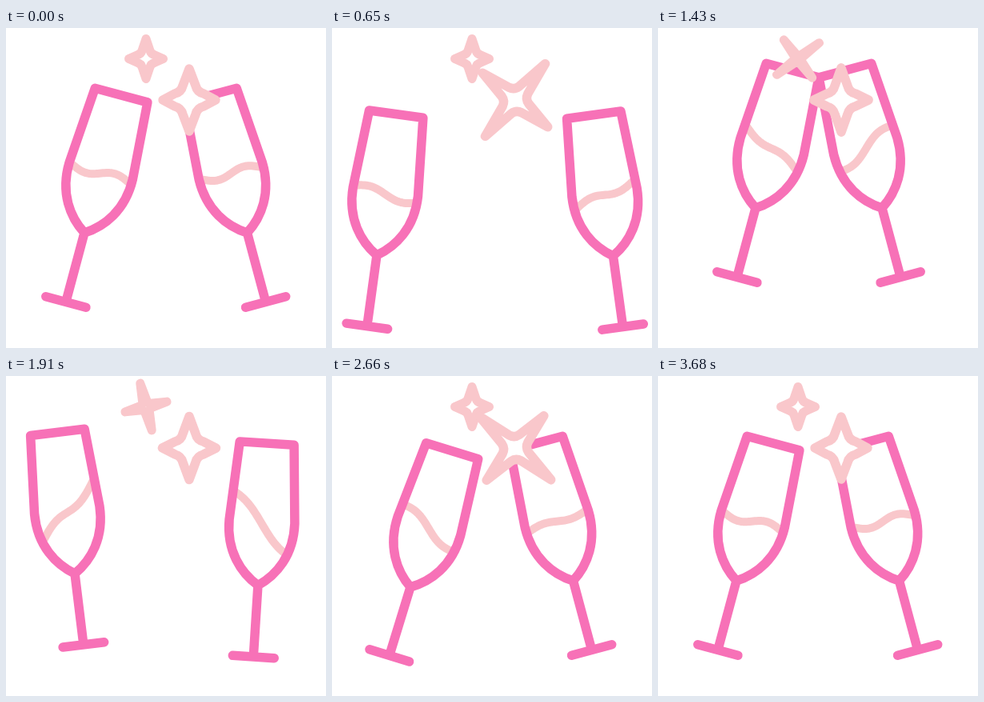
Recreate the animation shown at these times as an HTML page with a canvas. Size 400x400 px, loop 3.71 s.

```html
<!DOCTYPE html>
<html lang="en">
<head>
<meta charset="utf-8">
<title>Clinking glasses</title>
<style>
html, body { margin: 0; width: 100%; height: 100%; overflow: hidden; background: #fff; }
canvas { display: block; width: 400px; height: 400px; }
</style>
</head>
<body>
<canvas id="stage" width="400" height="400"></canvas>
<script>
const ctx = document.getElementById('stage').getContext('2d');
const PINK = '#f771b7', BLUSH = '#f9c7cb';
const LOOP = 3710, START = 230, STEP = 30, CLINK = 1430, SPIN = 1220;

// pose: [time, x, y, degrees] of the point where bowl meets stem
// wave: [time, slope, ripple] of the drink's surface
const glasses = [
  {
    pose: [[230, 98, 256, 15], [755, 53, 286, 7.3], [CLINK, 122, 225, 15],
           [1900, 86, 247, -7], [2330, 98, 279, 21], [2900, 98, 256, 15]],
    wave: [[230, .05, 5], [650, .17, -4], [1130, .33, -4.5], [CLINK, .5, 4],
           [1910, -.97, -6], [2660, .52, -4.5], [3660, .05, 5]]
  },
  {
    pose: [[230, 301.5, 256, -15], [755, 355, 287, -7.3], [CLINK, 280, 225, -15],
           [1810, 316, 260, 6], [2250, 304, 279, -21], [2600, 301.5, 256, -15]],
    wave: [[230, .05, 5], [650, -.33, -4.5], [1130, -.48, -4.5], [CLINK, -.53, 5],
           [1910, 1.05, -5], [2660, -.09, -3], [3400, .05, 5]]
  }
];

const easeInOut = p => p < .5 ? (2 * p) ** 2.2 / 2 : 1 - (2 - 2 * p) ** 2.2 / 2;
const easeOut = p => 1 - (1 - p) ** 2;
const easeIn = p => p ** 2.8;
const clamp = p => Math.min(1, Math.max(0, p));

function sample(keys, t, easeFor) {
  let i = 0;
  while (i < keys.length - 2 && t >= keys[i + 1][0]) i++;
  const a = keys[i], b = keys[i + 1];
  const p = clamp((t - a[0]) / (b[0] - a[0]));
  return a.slice(1).map((v, j) => v + (b[j + 1] - v) * easeFor(a[0], b[0], j)(p));
}

// Glasses speed up into the clink and bounce off it
function poseEase(from, to, channel) {
  if (from === CLINK) return easeOut;
  return to === CLINK && channel < 2 ? easeIn : easeInOut;
}

function stroke(color, width, cap = 'round') {
  ctx.strokeStyle = color;
  ctx.lineWidth = width;
  ctx.lineCap = cap;
  ctx.lineJoin = 'round';
  ctx.stroke();
}

const outline = new Path2D(
  'M0 0C-22-14-42-40-41-80L-34-178H34L41-80C42-40 22-14 0 0V87M-26 89.5H26');

function drawGlass({ pose, wave }, t) {
  const [x, y, angle] = sample(pose, t, poseEase);
  const [slope, ripple] = sample(wave, t, () => easeInOut);
  ctx.save();
  ctx.translate(x, y);
  ctx.rotate(angle * Math.PI / 180);
  ctx.beginPath();
  for (let u = -37; u <= 37; u += 2)
    ctx.lineTo(u, -77 + slope * u - ripple * Math.sin(Math.PI * u / 37));
  stroke(BLUSH, 10, 'butt');
  ctx.strokeStyle = PINK;
  ctx.lineWidth = 11.5;
  ctx.lineCap = ctx.lineJoin = 'round';
  ctx.stroke(outline);
  ctx.restore();
}

// Half turn while the arms stretch and the body tightens
function drawStar(star, t) {
  const begin = star.starts.filter(s => s <= t).pop() ?? t;
  const p = clamp((t - begin) / SPIN);
  const bump = Math.sin(Math.PI * p);
  const tall = star.tall + star.stretch * bump;
  const wide = star.wide + star.stretch * bump;
  const body = star.body * (1 - star.squeeze * bump);
  const near = 8 * body, far = 18 * body, bend = 10 * body;
  ctx.save();
  ctx.translate(star.x, star.y);
  ctx.rotate(Math.PI * easeInOut(p));
  ctx.beginPath();
  ctx.moveTo(0, -tall);
  for (const s of [1, -1]) {
    ctx.lineTo(s * near, -s * far);
    ctx.quadraticCurveTo(s * bend, -s * bend, s * far, -s * near);
    ctx.lineTo(s * wide, 0);
    ctx.lineTo(s * far, s * near);
    ctx.quadraticCurveTo(s * bend, s * bend, s * near, s * far);
    ctx.lineTo(0, s * tall);
  }
  ctx.closePath();
  ctx.fillStyle = '#fff';
  ctx.fill();
  stroke(BLUSH, star.line);
  ctx.restore();
}

const stars = [
  { x: 175, y: 38.5, tall: 25, wide: 21.5, stretch: 8.5, body: .6, squeeze: .65, line: 11, starts: [950] },
  { x: 229, y: 90, tall: 39, wide: 33, stretch: 22.5, body: 1, squeeze: .12, line: 11.5, starts: [230, 1900] }
];

function draw() {
  const now = performance.now() % LOOP;
  const t = now < START ? 0 : START + Math.floor((now - START) / STEP) * STEP;
  ctx.fillStyle = '#fff';
  ctx.fillRect(0, 0, 400, 400);
  glasses.forEach(g => drawGlass(g, t));
  stars.forEach(s => drawStar(s, t));
  requestAnimationFrame(draw);
}
draw();
</script>
</body>
</html>
```
